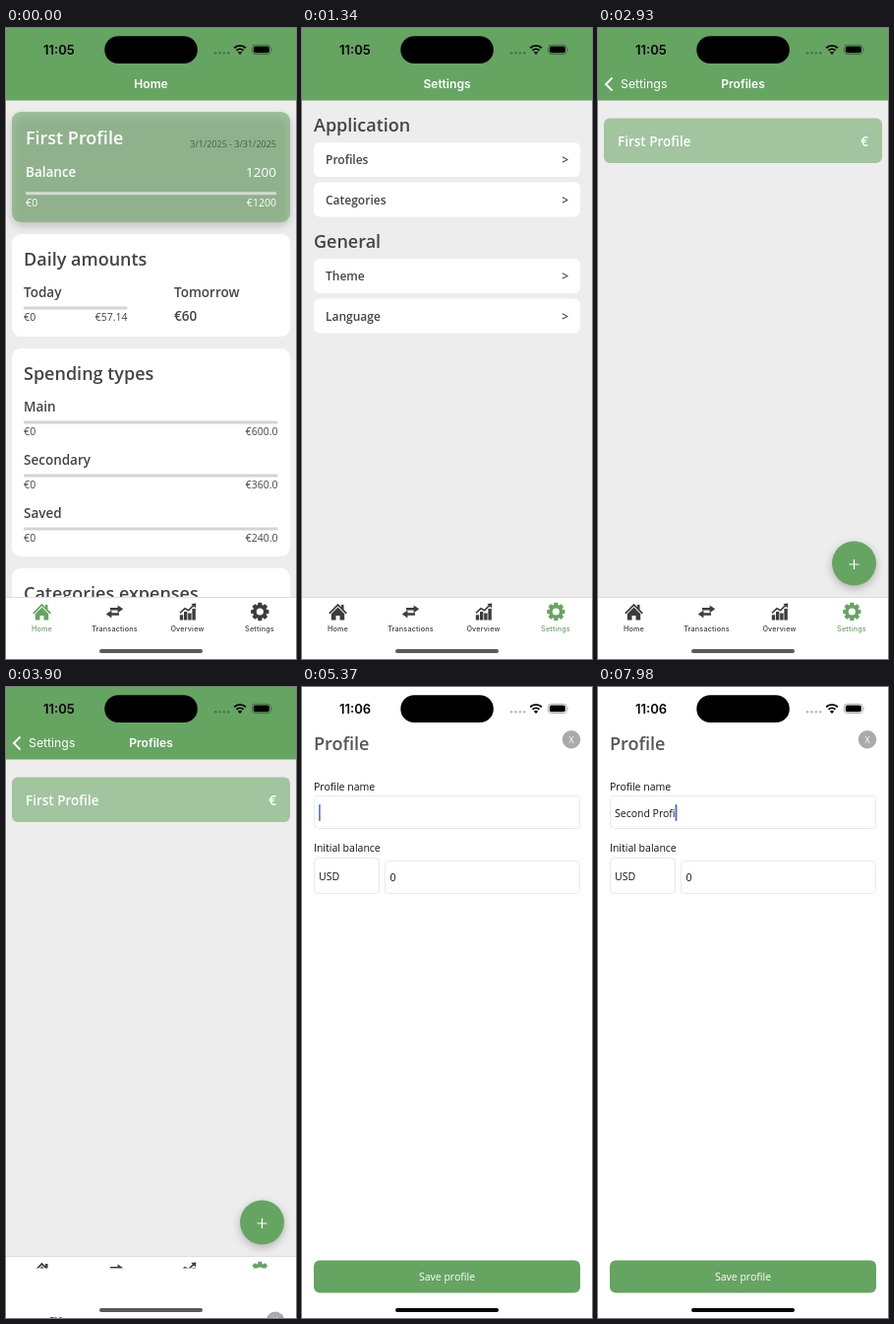
These frames come from a looping animation (295 by 640 pixels, 8000 ms). An HTML page:

```html
<!DOCTYPE html>
<html lang="en">
<head>
<meta charset="utf-8">
<title>Budget app: adding a profile</title>
<style>
html, body { margin: 0; width: 100%; height: 100%; overflow: hidden; background: #ededed; }
svg { display: block; width: 295px; height: 640px; --green: #66a462; --ink: #3d3d3d; --page: #ededed; }
text { font: 400 10.5px "Open Sans", "Noto Sans", sans-serif; fill: #444; white-space: pre; }
.big { font-size: 18px; font-weight: 600; }
.mid { font-size: 13.5px; font-weight: 600; }
.row { font-size: 12px; font-weight: 600; }
.num { font-size: 13.5px; }
.date { font-size: 9px; fill: #466144; }
.white { fill: #fff; }
.dark { fill: #111; }
.title, .back, .tab, .clock { font-family: Inter, "Liberation Sans", sans-serif; }
.title { font-size: 12.1px; font-weight: 600; fill: #fff; }
.back { font-size: 12.3px; fill: #fff; }
.clock { font-size: 13px; font-weight: 600; fill: #000; }
.tab { font-size: 7.2px; font-weight: 500; letter-spacing: .2px; fill: inherit; }
.tabItem { fill: var(--ink); stroke: var(--ink); }
.tabItem.on { fill: var(--green); stroke: var(--green); }
.tabItem * { stroke-width: 0; }
.tabItem .line { fill: none; stroke: inherit; stroke-width: 2; }
.page { fill: var(--page); }
.green { fill: var(--green); }
.tint { fill: var(--green); fill-opacity: .55; }
.field { fill: #fff; stroke: #e8e8e8; }
.shade { fill: #000; fill-opacity: .18; filter: blur(4px); }
.soft { filter: drop-shadow(0 3px 4px rgba(0, 0, 0, .25)); }
</style>
</head>
<body>
<svg id="stage" viewBox="0 0 295 640"></svg>
<script>
const LOOP = 8000;
const stage = document.getElementById('stage');

// Markup helpers
const text = (x, y, s, cls = '', anchor = 'start', id = '') =>
  `<text id="${id}" x="${x}" y="${y}" class="${cls}" text-anchor="${anchor}">${s}</text>`;
const right = (x, y, s, cls) => text(x, y, s, cls, 'end');
const center = (x, y, s, cls) => text(x, y, s, cls, 'middle');
const box = (x, y, w, h, r, attrs = 'fill="#fff"') =>
  `<rect x="${x}" y="${y}" width="${w}" height="${h}" rx="${r}" ${attrs}/>`;
const group = (id, body) => `<g id="${id}">${body}</g>`;
const page = box(0, 73, 295, 505, 0, 'class="page"');

const meter = (x, y, w, from, to, color = '#d4d4d4', cls = '') =>
  box(x, y, w, 3, 1, `fill="${color}"`) +
  text(x, y + 14.3, from, cls) + right(x + w, y + 14.3, to, cls);

const spending = (y, name, max) =>
  text(18, y, name, 'mid') + meter(18, y + 10, 258.5, '€0', max);

const home = group('home',
  box(6, 89, 283, 112, 9, 'class="shade"') +
  box(6, 85, 283, 112, 9, 'class="tint"') +
  text(20, 118, 'First Profile', 'big white') +
  right(275, 121, '3/1/2025 - 3/31/2025', 'date') +
  text(20, 150.5, 'Balance', 'mid white') + right(275, 150.5, '1200', 'num white') +
  meter(20, 166.2, 255, '€0', '€1200', '#d4dcd3', 'white') +
  box(6, 209, 283, 104, 9) +
  text(18, 240.5, 'Daily amounts', 'big') +
  text(18, 272.5, 'Today', 'mid') + meter(18, 282.6, 105.5, '€0', '€57.14') +
  text(171, 272.5, 'Tomorrow', 'mid') + text(171, 297.2, '€60', 'mid') +
  box(6, 325, 283, 211, 9) +
  text(18, 356.5, 'Spending types', 'big') +
  spending(388.6, 'Main', '€600.0') +
  spending(442.6, 'Secondary', '€360.0') +
  spending(496.6, 'Saved', '€240.0') +
  box(6, 548, 283, 80, 9) +
  text(18, 579.5, 'Categories expenses', 'big'));

const option = (y, name) =>
  box(12, y, 271, 35, 6) + text(24, y + 22, name, 'row') + right(271, y + 22, '&gt;', 'row');

const settings = group('settings', page +
  text(12, 104.6, 'Application', 'big') + option(116, 'Profiles') + option(156.5, 'Categories') +
  text(12, 222.6, 'General', 'big') + option(234, 'Theme') + option(274.5, 'Language'));

const profiles = group('profiles', page +
  group('loaded',
    box(6, 91.5, 283, 45.5, 6, 'class="tint"') +
    text(20, 119.5, 'First Profile', 'mid white') + right(275, 119.5, '€', 'mid white') +
    '<circle cx="260.5" cy="543" r="22.5" class="green soft"/>' +
    '<path d="M255.5 544h10M260.5 539v10" stroke="#fff" stroke-width="1.2"/>'));

const header = box(0, 0, 295, 73.5, 0, 'class="green"') +
  group('title', center(147.5, 61, 'Home', 'title')) +
  group('nextTitle', center(147.5, 61, 'Profiles', 'title')) +
  group('chevron', '<path d="M14.5 50.5L8 57l6.5 6.5" fill="none" stroke="#fff" stroke-width="1.9"/>') +
  group('back', text(23, 61.2, 'Settings', 'back'));

// Tab bar icons
const tooth = i => `<rect x="256.2" y="582.8" width="4.2" height="5" rx="1" transform="rotate(${i * 45} 258.3 592)"/>`;
const icons = [
  '<path d="M27.2 593.2L36.5 583.8l3.4 3.4v-2.2h2.6v4.8l3.4 3.4-1.2 1.2-8.2-8.1-8.1 8.1z"/>' +
  '<path d="M29.8 594.2L36.5 587.5l6.7 6.7v6.4h-4.7v-4.6h-4v4.6h-4.7z"/>',
  '<path d="M106 588h7.6v-2.6l5.6 3.9-5.6 3.9v-2.6H106zM115 593.2h-7.6v-2.6l-5.6 3.9 5.6 3.9v-2.6h7.6z"/>',
  '<path d="M176.8 600.6v-5.4h3.4v5.4zM181 600.6v-8.6h3.4v8.6zM185.2 600.6v-7h3.4v7zM189.4 600.6v-11.6h3.4v11.6z"/>' +
  '<path class="line" style="stroke-width:1.6" d="M177 593.3l5-4.6 3.6 2 5.6-5.6"/>' +
  '<path d="M188.3 584l5-.6-.4 5z"/>',
  [...Array(8).keys()].map(tooth).join('') +
  '<circle class="line" style="stroke-width:3.6" cx="258.3" cy="592" r="5.4"/>'
];
const tabs = ['Home', 'Transactions', 'Overview', 'Settings'].map((name, i) => {
  const x = [36.5, 110.5, 184.5, 258][i];
  return `<g class="tabItem">${icons[i]}${center(x, 611.6, name, 'tab')}</g>`;
}).join('');
const tabBar = box(0, 577, 295, 63, 0) + box(0, 577, 295, .8, 0, 'fill="#d6d6d6"') + tabs;

const modal = group('modal',
  box(0, 0, 295, 640, 0) +
  '<text x="12" y="63.6" class="big" style="fill:#555">Profile</text>' +
  '<circle cx="274" cy="53.3" r="9.2" fill="#aaa"/>' +
  '<text x="274" y="56.7" class="white" text-anchor="middle" style="font-size:9px">X</text>' +
  text(12, 104.5, 'Profile name', 'dark') +
  box(12.5, 110.5, 270, 33, 4, 'class="field"') +
  text(17, 131.5, '', 'dark', 'start', 'typed') +
  box(0, 119, 1.8, 17, .8, 'id="caret" fill="#4668dc"') +
  text(12, 167, 'Initial balance', 'dark') +
  box(12.5, 173.5, 66, 36, 4, 'class="field"') + text(17, 195.5, 'USD', 'dark') +
  box(84.5, 176.5, 198, 33, 4, 'class="field"') + text(89.5, 197, '0', 'dark') +
  box(12, 581.5, 271, 33, 6, 'class="green"') + center(147.5, 602, 'Save profile', 'white'));

const status = text(38, 26.6, '11:05', 'clock', 'start', 'clock') +
  box(100.3, 8.2, 94.5, 27.9, 13.9, 'fill="#000"') +
  [213, 217.4, 221.8, 226.2].map(x => `<circle cx="${x}" cy="25.3" r="1.4" opacity=".25"/>`).join('') +
  '<g fill="none" stroke="#000" stroke-width="1.9">' +
  '<path d="M232.2 20.2a8.4 8.4 0 0 1 11.6 0M234.5 22.8a5 5 0 0 1 7 0"/></g>' +
  '<path d="M238 27l-2.1-2.2a3 3 0 0 1 4.2 0z"/>' +
  box(250.4, 17.2, 18.8, 9.4, 3, 'fill="none" stroke="#000" stroke-opacity=".4" stroke-width=".8"') +
  box(251.8, 18.6, 16, 6.6, 1.8, 'fill="#000"') +
  '<path d="M270.2 20.4q1.4 1.5 0 3z" opacity=".45"/>' +
  box(95, 630, 105, 4, 2, 'id="grip" fill="#000"');

stage.innerHTML = box(0, 0, 295, 640, 0, 'class="page"') +
  home + settings + box(0, 73, 295, 505, 0, 'id="dim"') +
  profiles + header + tabBar + modal + status;

// Motion
const el = id => document.getElementById(id);
const clamp = v => Math.max(0, Math.min(1, v));
const ramp = (t, a, b) => clamp((t - a) / (b - a));
const spring = (t, start, end) => {
  if (t >= end) return 1;
  const k = Math.max(0, t - start) * .014;
  return 1 - (1 + k) * Math.exp(-k);
};
const move = (id, x, y = 0) => el(id).setAttribute('transform', `translate(${x} ${y})`);
const fade = (id, v) => el(id).setAttribute('opacity', v);
const show = (id, on) => { el(id).style.display = on ? '' : 'none'; };

// Time of each keystroke and how many letters stand afterwards
const message = 'Second Profi';
const keys = [[6120, 2], [6410, 3], [6530, 4], [6680, 5], [6910, 6], [7110, 7], [7560, 9], [7870, 11], [7980, 12]];

const caretAlpha = t => {
  if (t < 4820) return t < 4400 ? 0 : 1;
  if (t >= 5620) return 1;
  return t < 5370 ? 0 : .85 + .15 * ramp(t, 5370, 5620);
};

function draw(t) {
  const inSettings = t >= 900;
  const push = spring(t, 2062, 2520);
  const lift = spring(t, 3868, 4450);

  show('home', !inSettings);
  show('settings', inSettings && push < 1);
  el('title').firstChild.textContent = inSettings ? 'Settings' : 'Home';
  document.querySelectorAll('.tabItem').forEach((item, i) =>
    item.classList.toggle('on', i === (inSettings ? 3 : 0)));

  move('settings', -88.5 * push);
  move('profiles', 295 * (1 - push));
  fade('dim', .1 * push);
  move('title', -90 * push);
  fade('title', 1 - push);
  move('nextTitle', 178 * (1 - push));
  fade('nextTitle', push * push);
  move('back', 112 * (1 - push));
  fade('back', push);
  fade('chevron', Math.sqrt(push));
  fade('loaded', ramp(t, 2650, 2930));

  show('modal', lift > 0);
  move('modal', 0, 640 * (1 - lift));
  el('clock').textContent = t < 4230 ? '11:05' : '11:06';
  fade('grip', .65 + .35 * ramp(t, 5300, 5370));

  const count = keys.reduce((n, [at, len]) => t >= at ? len : n, 0);
  const typed = el('typed');
  typed.textContent = message.slice(0, count);
  el('caret').setAttribute('x', 17 + (count ? typed.getComputedTextLength() : 0));
  fade('caret', caretAlpha(t));
}

const begin = performance.now();
function tick() {
  draw((performance.now() - begin) % LOOP);
  requestAnimationFrame(tick);
}
tick();
</script>
</body>
</html>
```
